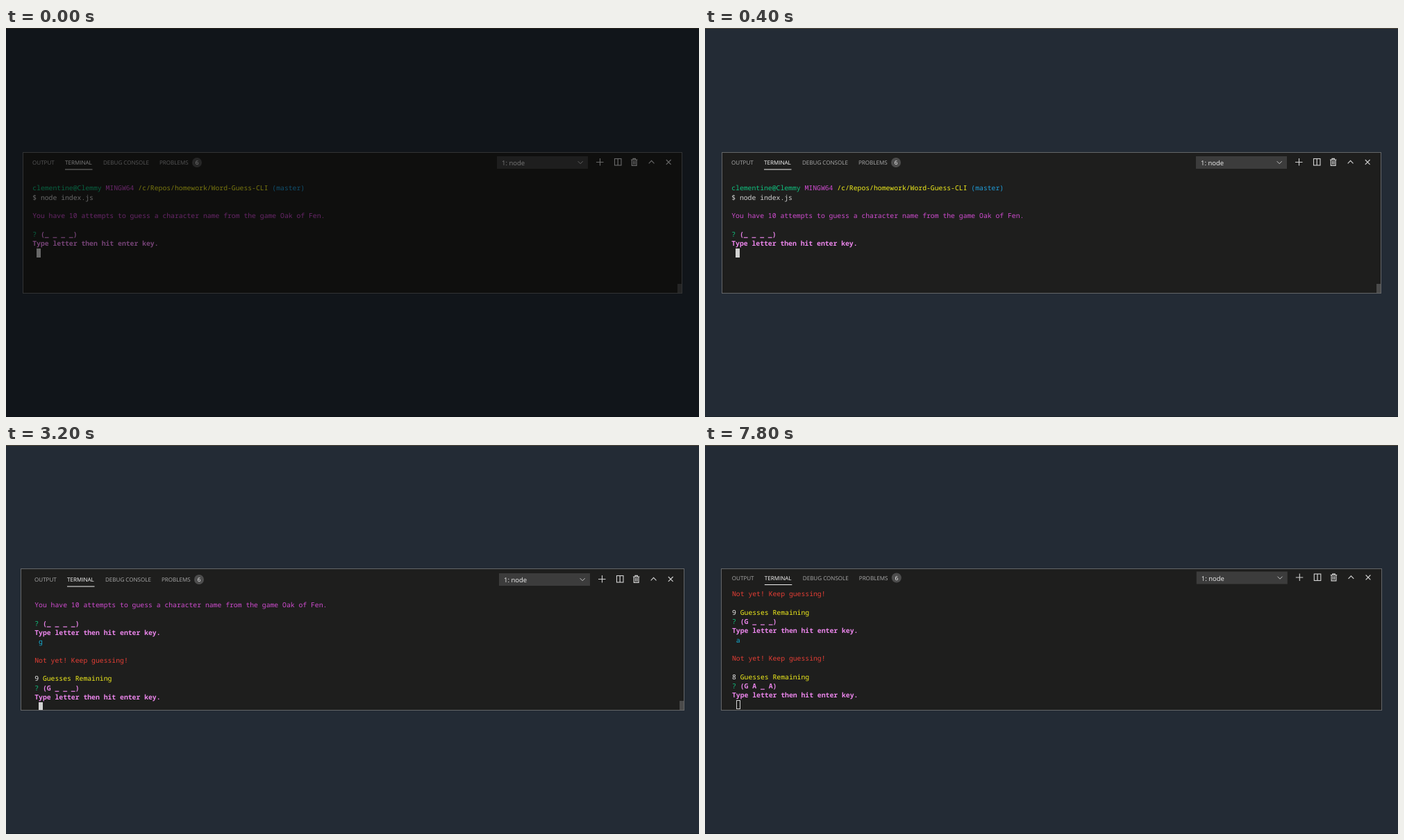
An HTML page with a canvas that plays this animation: 998 px wide and 561 px high, repeating every 8 s.

```html
<!DOCTYPE html>
<html lang="en">
<head>
<meta charset="utf-8">
<title>Word guess terminal</title>
<style>
html, body { margin: 0; width: 100%; height: 100%; overflow: hidden; background: #232b35; }
canvas { display: block; }
</style>
</head>
<body>
<canvas id="stage" width="998" height="561"></canvas>
<script>
const ctx = document.getElementById("stage").getContext("2d");
const W = 998, H = 561, LOOP = 8000, ROW = 13.25;
const MONO = '"Noto Sans Mono", "DejaVu Sans Mono", monospace';
const SANS = '"Open Sans", "Noto Sans", sans-serif';
const C = {
  green: "#10c480", purple: "#d04cd0", pink: "#ec86ec", yellow: "#f2ee1c",
  cyan: "#14b0d8", blue: "#209fdc", red: "#e63e35", text: "#d2d2d2", white: "#efefef"
};

// Each line: [row, [text, colour, bold], ...]
const intro = row => [row, ["You have 10 attempts to guess a character name from the game Oak of Fen.", C.purple]];
const ask = (row, word) => [
  [row, ["? ", C.green], ["(" + word + ")", C.pink, true]],
  [row + 1, ["Type letter then hit enter key.", C.pink, true]]
];
const miss = (row, left) => [
  [row, ["Not yet! Keep guessing!", C.red]],
  [row + 2, [left + " ", C.white], ["Guesses Remaining", C.yellow]]
];
const typed = (row, letter, color) => [row, [" " + letter, color]];

const startLines = [
  [0, ["clementine@Clemmy ", C.green], ["MINGW64 ", C.purple],
    ["/c/Repos/homework/Word-Guess-CLI ", C.yellow], ["(master)", C.blue]],
  [1, ["$ node index.js", C.text]],
  intro(3), ...ask(5, "_ _ _ _")
];
const firstGuess = [
  intro(0), ...ask(2, "_ _ _ _"), typed(4, "g", C.cyan),
  ...miss(6, 9), ...ask(9, "G _ _ _")
];
const secondGuess = [
  ...miss(0, 9), ...ask(3, "G _ _ _"), typed(5, "a", C.cyan),
  ...miss(7, 8), ...ask(10, "G A _ A")
];

// box: left, top, right, bottom; dx, dy: header shift; y: centre of row 0
const opening = {
  box: [24.5, 179.5, 973.5, 382.5], dx: 0, dy: 0, y: 231,
  lines: startLines, cursor: [1, 7], thumb: 369
};
const scenes = [
  { at: 0, ...opening, dim: 0.5 },
  { at: 200, ...opening },
  { at: 3000, box: [21.5, 178.5, 976.5, 382.5], dx: 3, dy: 0, y: 231,
    lines: firstGuess, cursor: [1, 11], thumb: 369 },
  { at: 5200, box: [23.5, 178.5, 974.5, 381.5], dx: 1, dy: -1.5, y: 229.6,
    lines: [...firstGuess, typed(11, "a", C.text)], cursor: [2, 11], thumb: 367 },
  { at: 7800, box: [23.5, 178.5, 974.5, 382.5], dx: 0.8, dy: -2.5, y: 215,
    lines: secondGuess, cursor: [1, 12], hollow: true }
];

function write(s, x, y, font, color, align = "left") {
  ctx.font = font;
  ctx.fillStyle = color;
  ctx.textAlign = align;
  ctx.fillText(s, x, y);
}

function stroke(color, width, ...paths) {
  ctx.strokeStyle = color;
  ctx.lineWidth = width;
  ctx.beginPath();
  for (const p of paths) {
    ctx.moveTo(p[0], p[1]);
    for (let i = 2; i < p.length; i += 2) ctx.lineTo(p[i], p[i + 1]);
  }
  ctx.stroke();
}

function fill(color, x, y, w, h) {
  ctx.fillStyle = color;
  ctx.fillRect(x, y, w, h);
}

function header() {
  const tab = "8.05px " + SANS, gray = "#adadad";
  write("OUTPUT", 38, 197, tab, gray);
  write("TERMINAL", 85, 197, tab, "#ffffff");
  write("DEBUG CONSOLE", 140, 197, tab, gray);
  write("PROBLEMS", 221, 197, tab, gray);
  fill(C.white, 85, 203.5, 39.5, 1);

  ctx.fillStyle = "#4d4d4d";
  ctx.beginPath();
  ctx.arc(275, 194, 7, 0, Math.PI * 2);
  ctx.fill();
  write("6", 275, 197, "8.2px " + SANS, "#ffffff", "center");

  fill("#3c3c3c", 707, 185, 131, 18);
  write("1: node", 714, 198, "9.5px " + SANS, "#f0f0f0");
  stroke("#c5c5c5", 1, [823.7, 192.2, 827.2, 195.7, 830.7, 192.2]);
}

function icons() {
  const c = "#d2d2d2";
  stroke(c, 1.1, [850, 193.5, 860.5, 193.5], [855.5, 188, 855.5, 198.5]);
  ctx.strokeRect(876.5, 188.5, 9.5, 9.5);
  stroke(c, 1.2, [881.2, 188.5, 881.2, 198]);
  stroke(c, 1.2, [900, 190, 909.4, 190], [903, 190, 903, 188.4, 906.4, 188.4, 906.4, 190],
    [901.3, 190, 901.3, 198.3, 908.1, 198.3, 908.1, 190],
    [903.6, 191.5, 903.6, 196.8], [905.8, 191.5, 905.8, 196.8]);
  stroke(c, 1.1, [925.7, 195.3, 929.6, 191.4, 933.5, 195.3]);
  stroke(c, 1.1, [950.8, 190, 957.6, 196.8], [957.6, 190, 950.8, 196.8]);
}

function terminal(s) {
  const x0 = s.dx + 38.2;
  ctx.font = "9.75px " + MONO;
  const adv = ctx.measureText("M").width;
  for (const [row, ...parts] of s.lines) {
    let col = 0;
    for (const [str, color, bold] of parts) {
      write(str, x0 + col * adv, s.y + row * ROW + 3.4, (bold ? "bold " : "") + "9.75px " + MONO, color);
      col += str.length;
    }
  }
  const [col, row] = s.cursor;
  const cx = Math.round(x0 + col * adv), cy = Math.round(s.y + row * ROW - 6.2);
  if (s.hollow) {
    ctx.strokeStyle = C.text;
    ctx.lineWidth = 1;
    ctx.strokeRect(cx + 0.5, cy + 0.5, 5, 12);
  } else {
    fill(C.text, cx, cy, 6, 13);
  }
}

function draw(t) {
  let s = scenes[0];
  for (const next of scenes) if (t >= next.at) s = next;
  const [l, top, r, b] = s.box;

  fill("#232b35", 0, 0, W, H);
  fill("#514a3b", 0, 0, W, 1);
  fill("#1b222a", 0, H - 1, W, 1);
  fill("#1e1e1d", l, top, r - l, b - top);

  ctx.save();
  ctx.beginPath();
  ctx.rect(l, top, r - l, b - top);
  ctx.clip();
  if (s.thumb) fill("#4b4b4b", r - 6.5, s.thumb, 6.5, b - s.thumb);
  terminal(s);
  ctx.translate(s.dx, s.dy);
  header();
  icons();
  ctx.restore();

  ctx.strokeStyle = "#646668";
  ctx.lineWidth = 1;
  ctx.strokeRect(l, top, r - l, b - top);

  if (s.dim) fill(`rgba(0,0,0,${s.dim})`, 0, 0, W, H);
}

ctx.textBaseline = "alphabetic";
ctx.textRendering = "geometricPrecision";
const begin = performance.now();
function tick(now) {
  draw(Math.max(0, now - begin) % LOOP);
  requestAnimationFrame(tick);
}
draw(0);
requestAnimationFrame(tick);
</script>
</body>
</html>
```
